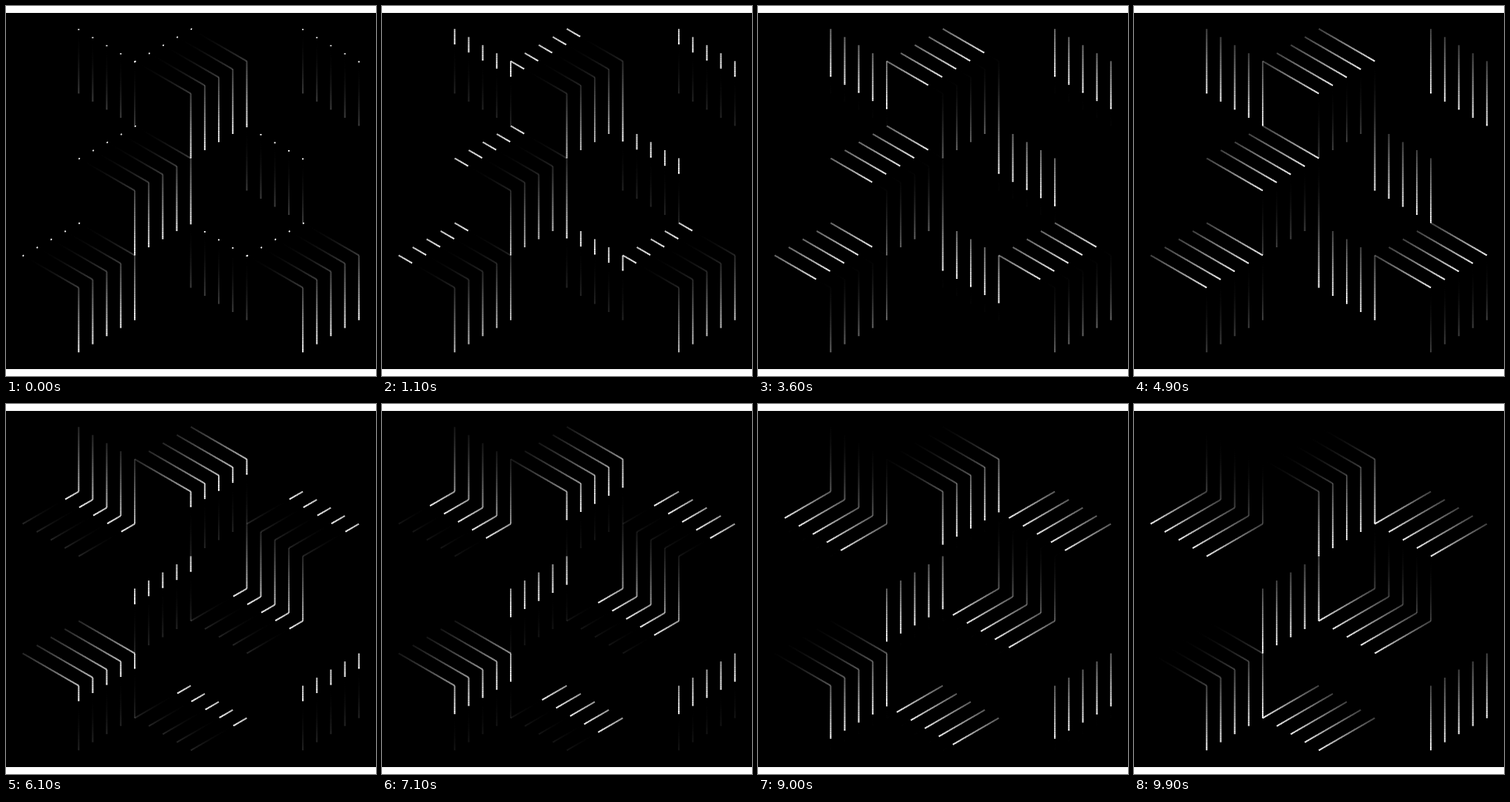
An HTML page with a canvas for the animation above (10 s loop, 480 by 480 pixels).

```html
<!DOCTYPE html>
<html lang="en">
<head>
<meta charset="utf-8">
<title>Isometric trails</title>
<style>
  html, body { margin: 0; width: 100%; height: 100%; overflow: hidden; background: #fff; }
  canvas { display: block; }
</style>
</head>
<body>
<canvas id="stage" width="480" height="480"></canvas>
<script>
const ctx = document.getElementById('stage').getContext('2d');

const STEP_MS = 100, STEPS = 100, HALF = 50;
const CELL_X = 72.7, CELL_Y = 41.97;
const LEFT = 21.6, TOP = 29.65;

const DOWN = [0, 2], RIGHT = [1, 1], LEFTWARD = [-1, 1];

// A face is five parallel lines; `slope` is the rise from its first to its last start point.
// `begin` is the step at which drawing starts; `shown` lists the halves in which it is visible.
const face = (col, row, slope, dir, begin, shown) => ({ col, row, slope, dir, begin, shown });

const faces = [
  face(1, 0, 1, DOWN, 0, [true, true]),
  face(5, 0, 1, DOWN, 0, [true, false]),
  face(4, 3, 1, DOWN, 0, [true, true]),
  face(3, 6, 1, DOWN, 0, [true, false]),

  face(2, 1, -1, RIGHT, 0, [true, true]),
  face(1, 4, -1, RIGHT, 0, [true, false]),
  face(0, 7, -1, RIGHT, 0, [true, true]),
  face(4, 7, -1, RIGHT, 0, [true, false]),

  face(3, 2, -1, DOWN, HALF, [true, true]),
  face(2, 5, -1, DOWN, HALF, [true, true]),
  face(1, 8, -1, DOWN, HALF, [true, true]),
  face(5, 8, -1, DOWN, HALF, [true, true]),

  face(1, 2, 1, LEFTWARD, HALF, [false, true]),
  face(5, 2, 1, LEFTWARD, HALF, [false, true]),
  face(4, 5, 1, LEFTWARD, HALF, [false, true]),
  face(3, 8, 1, LEFTWARD, HALF, [false, true])
];

const px = col => LEFT + col * CELL_X;
const py = row => TOP + row * CELL_Y;

function drawFace({ col, row, slope, dir, begin }, step) {
  for (let j = 0; j < HALF; j++) {
    const age = (step - begin - j + 2 * STEPS) % STEPS;
    const from = j / HALF, to = (j + 1) / HALF;
    ctx.globalAlpha = (1 - age / STEPS) ** 2;
    ctx.beginPath();
    for (let i = 0; i < 5; i++) {
      const c = col + i / 4, r = row + slope * i / 4;
      ctx.moveTo(px(c + dir[0] * from), py(r + dir[1] * from));
      ctx.lineTo(px(c + dir[0] * to), py(r + dir[1] * to));
    }
    ctx.stroke();
  }
}

function draw(time) {
  const step = Math.floor(time / STEP_MS) % STEPS;
  const half = step < HALF ? 0 : 1;
  ctx.globalAlpha = 1;
  ctx.fillStyle = '#fff';
  ctx.fillRect(0, 0, 480, 480);
  ctx.fillStyle = '#000';
  ctx.fillRect(0, 9, 480, 462);
  ctx.strokeStyle = '#fff';
  ctx.lineWidth = 2;
  for (const f of faces) if (f.shown[half]) drawFace(f, step);
}

function tick() {
  draw(performance.now());
  requestAnimationFrame(tick);
}
tick();
</script>
</body>
</html>
```
